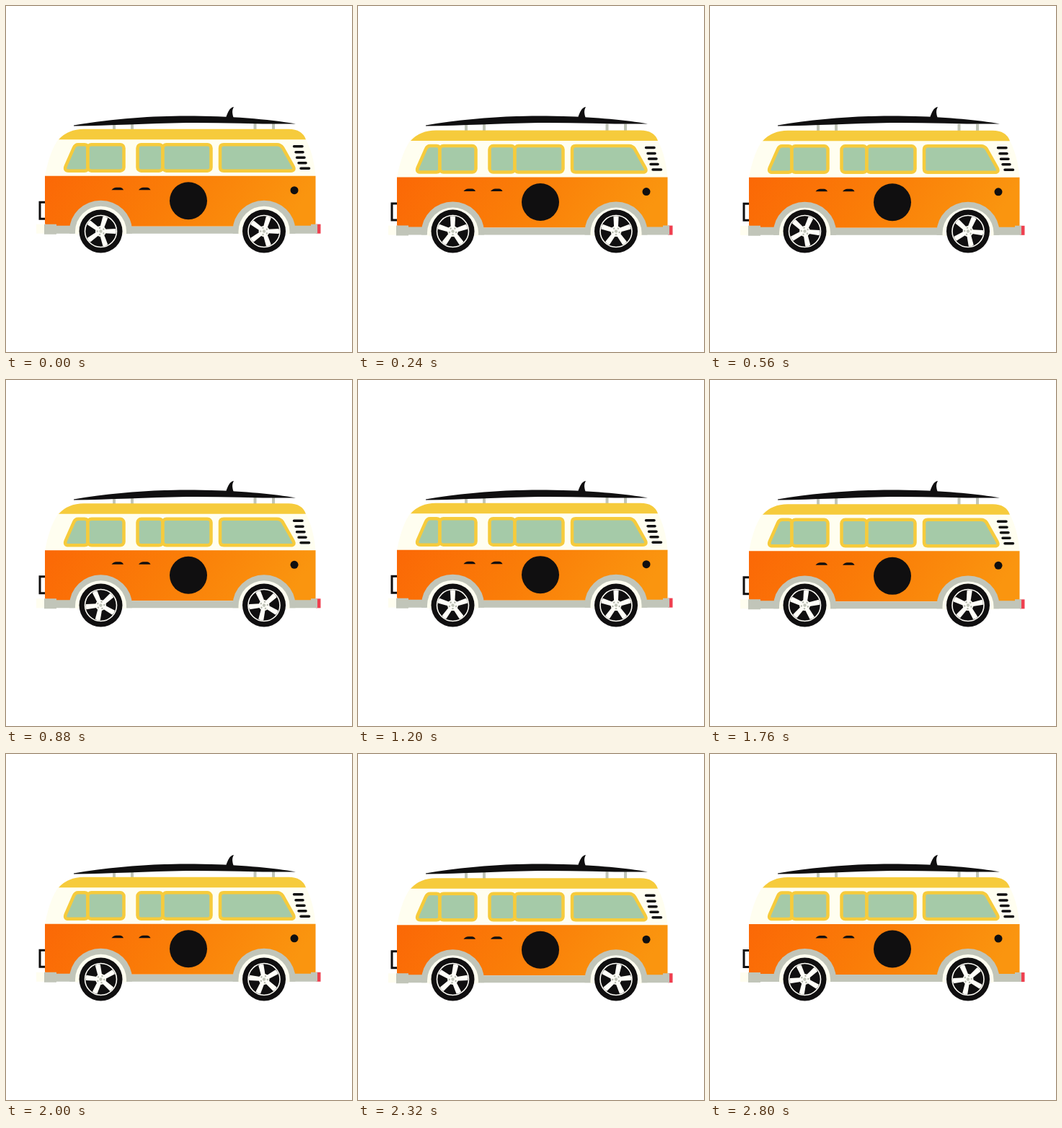
Animation of 480 by 480 pixels, one loop 2880 ms. Source, as an HTML page:

```html
<!DOCTYPE html>
<html lang="en">
<head>
<meta charset="utf-8">
<title>Camper van</title>
<style>
html, body { margin: 0; height: 100%; overflow: hidden; background: #fff; }
svg { display: block; width: 100%; height: 100%; }
</style>
</head>
<body>
<svg viewBox="0 0 480 480">
  <defs>
    <linearGradient id="paint" x2="1" y2=".12">
      <stop stop-color="#fb6806"/>
      <stop offset=".5" stop-color="#fa7d08"/>
      <stop offset="1" stop-color="#fa950f"/>
    </linearGradient>
    <path id="spoke" d="M-2.6 0L-3.6 -20.5Q0 -22 3.6 -20.5L2.6 0Z" fill="#fffef8"/>
    <g id="wheel">
      <circle r="30" fill="#100f10"/>
      <circle r="22" fill="none" stroke="#fffef8" stroke-width="1.6"/>
      <g class="rim">
        <circle r="7.5" fill="#fffef8"/>
      </g>
    </g>
  </defs>

  <g class="body">
    <path d="M150 162V173M175 162V173M345.500 162V173M371 162V173" stroke="#c1c5b9" stroke-width="4"/>
  </g>
  <g fill="#100f10">
    <path d="M94 165.500C150 156 205 152.500 250 152.500C310 152.500 365 157 402 163.500C350 164 300 161.500 250 162C195 163 145 166 94 166.500Z"/>
    <path d="M305 155C308 147 310 141 316 140C313 145 314 150 316 156Z"/>
  </g>

  <g class="body">
    <path d="M54 272.500H47V295.500H54" fill="none" stroke="#100f10" stroke-width="3"/>
    <path d="M73 184.500H415.500C424 200 428 218 429.500 237H54C57 220 62 200 73 184.500Z" fill="#fffef0"/>
    <path d="M73 185.500Q86 171 108 171H392Q411 171 416 185.500Z" fill="#f6cb3c"/>
    <path d="M54 236H429.500V306H54Z" fill="url(#paint)"/>
    <path d="M42 303H55V316H42Z" fill="#fffef0"/>
    <path d="M430 303H436.500V316H430Z" fill="#ef4050"/>
    <g fill="#c1c5b9">
      <path d="M53 303H70V305H95V316H70V317H53ZM165 306H325V316H165ZM390 305H423V303H432V316H390Z"/>
      <path id="arch" d="M88 316V312A43.500 42 0 0 1 175 312V316Z"/>
      <use href="#arch" x="226.500"/>
    </g>
    <g fill="#fffef0">
      <path id="well" d="M96 317V313A35.500 35 0 0 1 167 313V317Z"/>
      <use href="#well" x="226.500"/>
    </g>
    <g fill="#a5caa8" stroke="#f6cb3c" stroke-width="4.500">
      <path d="M100 192.500H109Q113.500 192.500 113.500 197V224.500Q113.500 229 109 229H87Q80 229 83 222L94 197Q96 192.500 100 192.500Z"/>
      <rect x="113.500" y="192.500" width="50" height="36.500" rx="5"/>
      <rect x="182.500" y="192.500" width="35" height="36.500" rx="5"/>
      <rect x="217.500" y="192.500" width="67" height="36.500" rx="5"/>
      <path d="M302 192.500H376Q381 192.500 384 197L398 222Q402 229 395 229H302Q297 229 297 224V197.500Q297 192.500 302 192.500Z"/>
    </g>
    <path d="M399.500 195H411M402 203H412M403.500 210.500H414M406 218H416M409 225.500H420.500" stroke="#100f10" stroke-width="3.500" stroke-linecap="round"/>
    <g fill="#100f10">
      <path id="handle" d="M146.500 255.500Q149 252 153 252H158Q161.500 252 163 255.500Z"/>
      <use href="#handle" x="37.500"/>
      <circle cx="400" cy="256" r="5.500"/>
      <circle cx="253" cy="270.500" r="26"/>
    </g>
  </g>

  <use href="#wheel" x="131.500" y="312.500"/>
  <use href="#wheel" x="358" y="312.500"/>
</svg>
<script>
const LOOP = 2880, STEP = 80, TURNS = 3, BOUNCES = 7;
const rim = document.querySelector(".rim");
const bodyParts = document.querySelectorAll(".body");

let details = "";
for (let a = 0; a < 360; a += 72) {
  details += `<use href="#spoke" transform="rotate(${a})"/>`;
}
for (let a = 36; a < 396; a += 72) {
  details += `<circle cy="-4.8" r="1.3" fill="#b9bdb2" transform="rotate(${a})"/>`;
}
rim.innerHTML += details + '<circle r="2.2" fill="#c1c5b9"/>';

function draw(now) {
  const phase = Math.floor(now % LOOP / STEP) * STEP / LOOP;
  const bounce = 0.8 - 1.2 * Math.cos(2 * Math.PI * (BOUNCES * phase + 0.05));
  bodyParts.forEach(part => part.setAttribute("transform", `translate(0 ${bounce.toFixed(2)})`));
  rim.setAttribute("transform", `rotate(${18 - 360 * TURNS * phase})`);
}

const start = performance.now();
function tick() {
  draw(performance.now() - start);
  requestAnimationFrame(tick);
}
tick();
</script>
</body>
</html>
```
